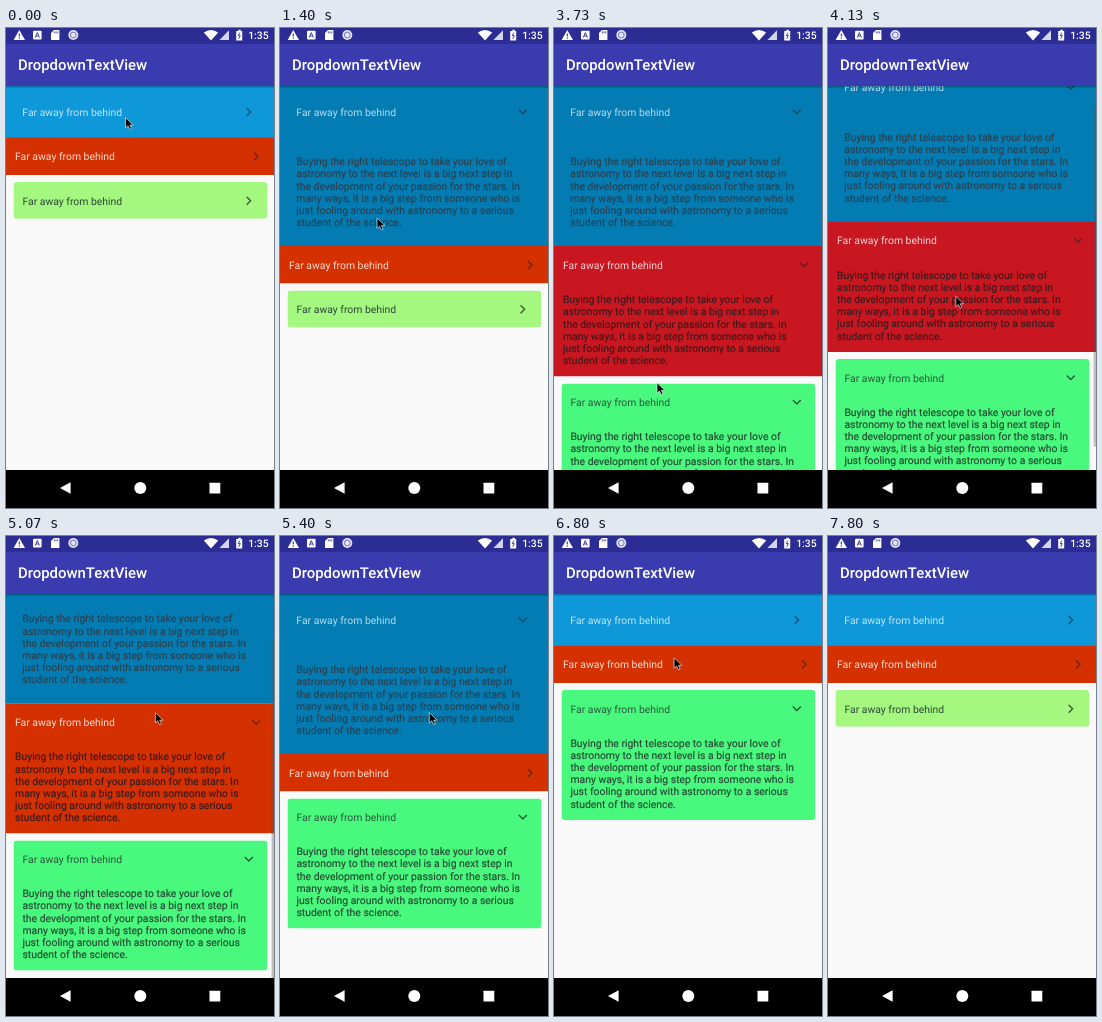
These frames come from a looping animation (268 by 480 pixels, 8.07 s). An HTML page:

```html
<!DOCTYPE html>
<html lang="en">
<head>
<meta charset="utf-8">
<title>Dropdown panels</title>
<style>
  html, body { margin: 0; width: 100%; height: 100%; overflow: hidden; background: #f9f9f9; }
  #stage { display: block; width: 268px; height: 480px; }
  text { font: 10.42px Roboto, "Noto Sans", sans-serif; text-rendering: geometricPrecision; white-space: pre; }
  .bar { font-size: 14.9px; font-weight: 500; fill: #fff; }
  .clock { font-weight: 500; fill: #fff; }
  .body { stroke-width: .15; }
  .arrow { fill: none; stroke: #222; stroke-width: 1.4; }
</style>
</head>
<body>
<svg id="stage" viewBox="0 0 268 480">
  <defs>
    <linearGradient id="shade" x2="0" y2="1">
      <stop offset="0" stop-opacity=".3"/>
      <stop offset="1" stop-opacity="0"/>
    </linearGradient>
  </defs>
  <rect width="268" height="480" fill="#f9f9f9"/>
  <g id="list"></g>
  <rect id="thumb" x="265.6" width="2.4" fill="#555" fill-opacity=".35"/>

  <rect y="58" width="268" height="2.5" fill="url(#shade)"/>
  <rect width="268" height="58" fill="#3b3bb0"/>
  <rect width="268" height="16" fill="#2b2d94"/>
  <text class="bar" x="12" y="42.4">DropdownTextView</text>

  <g fill="#fff">
    <path d="M13.3 2 L19 12 H7.6Z"/>
    <rect x="27" y="2.8" width="8.6" height="8.6" rx="1"/>
    <path d="M48 2 H53.4 V12 H45 V5Z"/>
    <circle cx="67.3" cy="7" r="5" fill="#e2e3f5"/>
    <path d="M197.8 4.6 Q205 -.6 212.2 4.6 L205 12.4Z"/>
    <path d="M223 2.2 V12 H213.4Z" fill-opacity=".8"/>
    <path d="M231.5 3 H232.4 V1.8 H234.8 V3 H236.2 V12.4 H230.2 V3Z"/>
  </g>
  <g fill="none" stroke="#2b2d94">
    <path d="M13.3 5.4 V8.6 M13.3 9.5 V10.7" stroke-width="1.1"/>
    <path d="M29.2 9.6 L31.3 4.6 L33.4 9.6 M30 8 H32.6" stroke-width=".9"/>
    <path d="M48.3 3.4 V5.4 M50 3.4 V5.4 M51.7 3.4 V5.4" stroke-width=".8"/>
    <circle cx="67.3" cy="7" r="2.9" stroke="#7375b8"/>
    <path d="M233.9 4.6 L232.2 7.6 H234.3 L232.7 10.8" stroke-width=".9"/>
  </g>
  <text class="clock" x="242.2" y="11">1:35</text>

  <rect y="442" width="268" height="38"/>
  <g fill="#fff">
    <path d="M54 460 L64.6 454.2 V465.8Z"/>
    <circle cx="134.3" cy="460" r="6"/>
    <rect x="203.5" y="454.7" width="10.8" height="10.8" rx=".6"/>
  </g>
  <path id="cursor" d="M0 0 V10.4 L2.5 8.2 L4.3 12 L6.1 11.2 L4.4 7.5 H7.8Z"
        fill="#000" stroke="#fff" stroke-width=".6"/>
</svg>
<script>
const LOOP = 8070, STEP = 1000 / 15, TOP = 58, BOTTOM = 442, EASE_MS = 300;
const TITLE = 'Far away from behind';
const LINES = [
  'Buying the right telescope to take your love of',
  'astronomy to the next level is a big next step in',
  'the development of your passion for the stars. In',
  'many ways, it is a big step from someone who is',
  'just fooling around with astronomy to a serious',
  'student of the science.'
];

const panels = [
  { x: 0, w: 268, gap: 0, small: 51.5, big: 160, pad: 16.3, titleY: 26, bodyY: 75.5, arrowX: 242.8, radius: 0,
    shut: '#0e97d9', lit: '#037cb3', ink: ['#bfe6f7', '#b5dcee'], body: '#2b404e', arrowInk: .55,
    open: 515, close: 6250 },
  { x: 0, w: 268, gap: 0, small: 37, big: 130, pad: 9, titleY: 19, bodyY: 53.5, arrowX: 250.2, radius: 0,
    shut: '#d53000', lit: '#c91722', ink: ['#fbdcd0', '#f6d3d4'], body: '#3a1a1c', arrowInk: .6,
    open: 1990, close: 5055 },
  { x: 7.5, w: 253.8, gap: 7.5, small: 36.7, big: 130, pad: 8.9, titleY: 18.7, bodyY: 53, arrowX: 235.3, radius: 3.5,
    shut: '#a4f87f', lit: '#48f97e', ink: ['#2c4638', '#27593c'], body: '#244532', arrowInk: .75,
    open: 2985, close: 7320 }
];

// time, x, y of the pointer tip
const PATH = [
  [0, 119.5, 89.5], [700, 119.5, 89.5], [1333, 97, 190], [1400, 97, 190], [1730, 89.3, 243.8],
  [2270, 89.3, 243.8], [2800, 98, 371], [3330, 98, 371], [3730, 103, 354.8], [3870, 106, 345],
  [4400, 150, 190], [4670, 161, 167], [4870, 149.3, 176.6], [5400, 149.3, 176.6], [6130, 119.5, 90.5],
  [6600, 119.5, 90.5], [7070, 121, 172], [7450, 121, 172], [7780, 272, 97], [LOOP, 272, 97]
];

const $ = id => document.getElementById(id);
const clamp = v => Math.max(0, Math.min(1, v));
const smooth = p => .5 - Math.cos(Math.PI * clamp(p)) / 2;
const mix = (a, b, p) => a + (b - a) * p;

function add(parent, tag, attrs, text) {
  const el = document.createElementNS('http://www.w3.org/2000/svg', tag);
  for (const k in attrs) el.setAttribute(k, attrs[k]);
  if (text) el.textContent = text;
  return parent.appendChild(el);
}

for (const p of panels) {
  p.box = add($('list'), 'svg', { x: p.x, width: p.w, overflow: 'hidden' });
  p.back = add(p.box, 'rect', { width: '100%', height: '100%', rx: p.radius });
  p.title = add(p.box, 'text', { x: p.pad, y: p.titleY + 3.8 }, TITLE);
  p.arrow = add(p.box, 'path', { class: 'arrow', d: 'M-2.2 -4 L1.8 0 L-2.2 4', 'stroke-opacity': p.arrowInk });
  const body = add(p.box, 'g', { fill: p.body, stroke: p.body });
  LINES.forEach((line, i) =>
    add(body, 'text', { class: 'body', x: p.pad, y: p.bodyY + 3.6 + i * 12.21 }, line));
}

function pointer(t) {
  const i = Math.max(1, PATH.findIndex(k => k[0] > t));
  const [t0, x0, y0] = PATH[i - 1], [t1, x1, y1] = PATH[i];
  const p = smooth((t - t0) / (t1 - t0));
  return [mix(x0, x1, p), mix(y0, y1, p)];
}

function draw(t) {
  let y = TOP;
  for (const p of panels) {
    p.amount = smooth((t - p.open) / EASE_MS) - smooth((t - p.close) / EASE_MS);
    p.h = mix(p.small, p.big, p.amount);
    p.y = y + p.gap;
    y = p.y + p.h;
  }
  const content = y + 7.5 - TOP, view = BOTTOM - TOP;
  const room = Math.max(0, content - view);
  const scroll = Math.min(room, 51.5 * smooth((t - 3930) / 420));

  for (const p of panels) {
    const on = t >= p.open && t < p.close;
    const overlap = p.gap ? 0 : .5; // hides the seam between touching panels
    p.box.setAttribute('y', p.y - scroll);
    p.box.setAttribute('height', p.h + overlap);
    p.back.setAttribute('fill', on ? p.lit : p.shut);
    p.title.setAttribute('fill', p.ink[on ? 1 : 0]);
    p.arrow.setAttribute('transform', `translate(${p.arrowX} ${p.titleY}) rotate(${90 * p.amount})`);
  }

  const thumb = $('thumb');
  thumb.setAttribute('y', TOP + scroll * view / content);
  thumb.setAttribute('height', view * view / Math.max(view, content));
  thumb.setAttribute('opacity', clamp((t - 3900) / 60) * clamp((5400 - t) / 250));

  $('cursor').setAttribute('transform', `translate(${pointer(t)})`);
}

const start = performance.now();
function tick() {
  const t = (performance.now() - start) % LOOP;
  draw(Math.floor((t + 4) / STEP) * STEP);
  requestAnimationFrame(tick);
}
tick();
</script>
</body>
</html>
```
